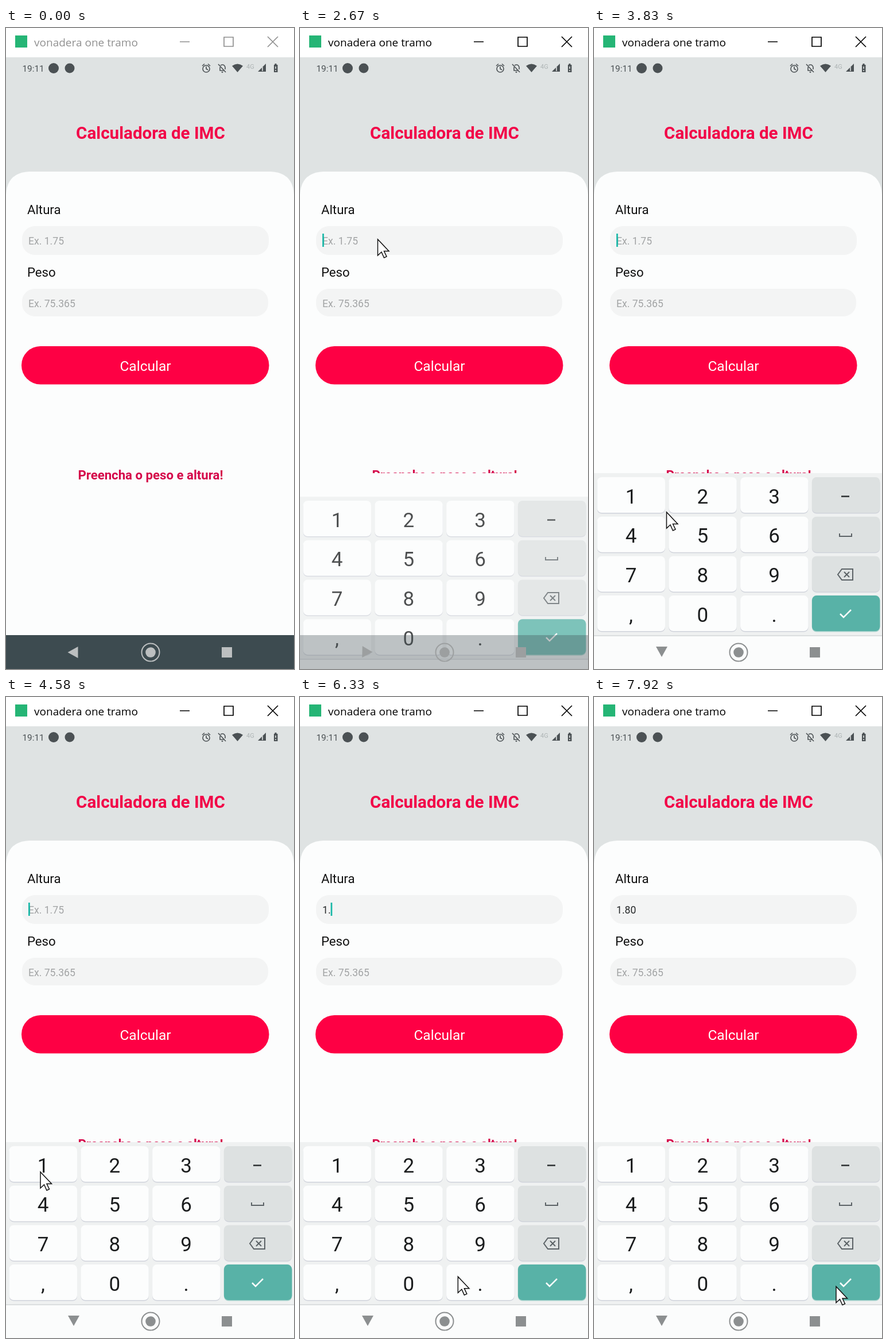
Animation, 502 px wide and 1116 px high, one loop 8000 ms. Source, as an HTML page:

```html
<!DOCTYPE html>
<html lang="pt">
<head>
<meta charset="utf-8">
<style>
  html, body { margin: 0; width: 502px; height: 1116px; overflow: hidden; background: #fcfdfd; }
  svg { display: block; font-family: Roboto, sans-serif; }
  .mid { text-anchor: middle; }
  .line { fill: none; stroke: currentColor; }
</style>
</head>
<body>
<svg width="502" height="1116" viewBox="0 0 502 1116">
  <rect width="502" height="300" y="50" fill="#dfe3e3"/>
  <rect width="502" height="51" fill="#fff"/>
  <rect x="16" y="13" width="21" height="21" fill="#25b575"/>
  <g id="titlebar">
    <text x="49" y="32" font-size="19" font-family="Open Sans, sans-serif" fill="currentColor">vonadera one tramo</text>
    <path class="line" stroke-width="1.7" d="M303 24h17M380 16h16v16h-16zM456 15l18 18M474 15l-18 18"/>
  </g>

  <g fill="#4b5154" color="#4b5154" stroke-width="1.6">
    <text x="28.5" y="76" font-size="15.3">19:11</text>
    <circle cx="83" cy="70" r="9"/>
    <circle cx="111" cy="70" r="8.5"/>
    <circle class="line" cx="349" cy="71" r="6"/>
    <path class="line" d="M349 67v4l3 2M342 66l4-3.500M356 66l-4-3.500"/>
    <path class="line" d="M370 63l13 14M373 68v6h8M374 65q6-3 8 3v4"/>
    <path d="M375 76h4l-2 2.500zM394 66q9.500-7 19 0l-9.500 11zM439 76l14-14v14zM467 64h1.500v-2h3v2h2v13h-6.500z"/>
    <path d="M470 67v4M470 73v2M447 68v7" stroke="#dfe3e3"/>
    <text x="419" y="71" font-size="11" fill="#aeb4b5">4G</text>
  </g>

  <text class="mid" x="252" y="193" font-size="29.6" font-weight="700" fill="#f20648">Calculadora de IMC</text>
  <path d="M0 1057V290Q2 252 40 250H462Q500 252 502 290V1057z" fill="#fcfdfd"/>
  <g font-size="22.2" fill="#111">
    <text x="37" y="324">Altura</text>
    <text x="37" y="433">Peso</text>
  </g>
  <rect x="28" y="345" width="430" height="50" rx="22" fill="#f3f4f4"/>
  <rect x="28" y="454" width="429" height="48" rx="22" fill="#f3f4f4"/>
  <g font-size="17.6" fill="#a2a4a5">
    <text id="height" x="39" y="376.5"></text>
    <text x="39" y="485.5">Ex. 75.365</text>
  </g>
  <rect id="caret" y="358" width="2.7" height="23" fill="#18b8a8"/>
  <rect x="27" y="554" width="431.5" height="66.5" rx="33" fill="#fe0044"/>
  <text class="mid" x="243" y="597" font-size="24.5" fill="#fff">Calcular</text>
  <text class="mid" x="252" y="786" font-size="22.2" font-weight="700" fill="#d5074a">Preencha o peso e altura!</text>

  <g id="keyboard">
    <rect y="775" width="502" height="341" fill="#fcfdfd"/>
    <g id="panel">
      <rect y="775" width="502" height="283" fill="#eff1f1"/>
      <rect y="1057" width="502" height="2" fill="#dcdfe0"/>
      <rect y="1059" width="502" height="57" fill="#fbfcfc"/>
      <g id="keys" font-size="35" fill="#1b1d1e"></g>
      <g color="#5c6367" stroke-width="2">
        <path class="line" color="#2c3032" stroke-width="2.5" d="M431 815.500h14"/>
        <path class="line" d="M428 880v5h21v-5"/>
        <path class="line" d="M425 951.500l7-9.500h19v19h-19zM436 947l9 9M445 947l-9 9"/>
        <path class="line" color="#fff" stroke-width="2.5" d="M429 1020l6 6l13-13"/>
      </g>
    </g>
  </g>
  <rect id="navShade" y="1057" width="502" height="59" fill="#3d4b50"/>
  <g id="nav" fill="currentColor">
    <path id="back" d="M-9 0L9-10V10z"/>
    <circle class="line" cx="252" cy="1087" r="15.5" stroke-width="2"/>
    <circle cx="252" cy="1087" r="8.8"/>
    <rect x="376" y="1078" width="18" height="18"/>
  </g>
  <path id="pointer" d="M0 0V28L6.500 22L11 32L15.500 30L11 20.500H19.500z" fill="#fff" stroke="#111" stroke-width="1.5"/>
</svg>
<script>
const $ = id => document.getElementById(id);
const set = (id, attributes) => {
  for (const name in attributes) $(id).setAttribute(name, attributes[name]);
};
const visible = on => on ? 'visible' : 'hidden';
const mix = (a, b, p) => a + (b - a) * p;

const STEP = 1000 / 12, LOOP = 8000;
const FOCUS = 330, ACTIVATE = 830, TAP_FIELD = 2420, OPEN = 2670;
const BLINK = 500, KEY_HOLD = 160;

const labels = [...'123 456 789 ,0. '];
$('keys').innerHTML = labels.map((label, i) => {
  const col = i % 4, x = 5.5 + col * 124.8, y = 782 + (i >> 2) * 68.7;
  const enter = i === labels.length - 1;
  const fill = enter ? '#58b2a7' : col === 3 ? '#dde1e1' : '#fcfdfd';
  const key = (dy, color, id) =>
    `<rect id="${id}" x="${x}" y="${y + dy}" width="118.5" height="62" rx="8" fill="${color}"/>`;
  return key(1.5, enter ? '#a9d3cd' : '#d0d3db', 'edge' + i) + key(0, fill, 'key' + i) +
    `<text class="mid" x="${x + 59}" y="${y + 45.5}">${label}</text>`;
}).join('');

const taps = [
  { char: '1', at: 5330 },
  { char: '.', at: 6170 },
  { char: '8', at: 6670 },
  { char: '0', at: 7170 }
];

// Pointer glides; "via" bends the curve
const moves = [
  { from: 1250, until: 2080, to: [135.5, 368], via: [184, 560] },
  { from: 3000, until: 3830, to: [126.5, 843], via: [360, 880] },
  { from: 3840, until: 4580, to: [60, 827] },
  { from: 5330, until: 5920, to: [322, 1040], via: [148, 890] },
  { from: 6250, until: 6500, to: [213, 968] },
  { from: 6670, until: 6830, to: [192.5, 1023] },
  { from: 7170, until: 7920, to: [422, 1026.5], via: [500, 1035] }
];

function pointerAt(t) {
  let spot = [-3, 749];
  for (const { from, until, to, via } of moves) {
    if (t < from) break;
    const p = 1 - (1 - Math.min(1, (t - from) / (until - from))) ** 1.3;
    spot = spot.map((start, axis) => {
      const bend = via ? via[axis] : mix(start, to[axis], 0.5);
      return mix(mix(start, bend, p), mix(bend, to[axis], p), p);
    });
  }
  return spot;
}

function drawField(t) {
  const done = taps.filter(tap => t >= tap.at);
  const value = done.map(tap => tap.char).join('');
  $('height').textContent = value || 'Ex. 1.75';
  set('height', { fill: value ? '#26292a' : '#a2a4a5' });

  const restart = done.length ? done.at(-1).at : t >= TAP_FIELD ? TAP_FIELD : FOCUS;
  const lit = t >= restart && Math.floor((t - restart) / BLINK) % 2 === 0;
  const width = value ? $('height').getComputedTextLength() : 0;
  set('caret', { x: 39 + width, visibility: visible(lit) });
}

function drawKeyboard(t) {
  const open = t < OPEN ? 0 : 1 - 0.33 * Math.max(0, 1 - (t - OPEN) / 250) ** 2;
  const grey = mix(188, 140, open);
  set('keyboard', { visibility: visible(open) });
  set('panel', { transform: `translate(0 ${125 * (1 - open)})`, opacity: mix(0.3, 1, open) });
  set('navShade', { opacity: 1 - open });
  set('nav', { color: `rgb(${grey},${grey + 3},${grey + 4})` });
  set('back', { transform: `translate(${mix(116.5, 118, open)} ${mix(1087, 1086, open)}) rotate(${270 * open})` });

  for (const { char, at } of taps) {
    const down = t >= at - KEY_HOLD && t < at + STEP;
    set('key' + labels.indexOf(char), { fill: down ? '#eef2f2' : '#fcfdfd' });
  }
}

function draw(ms) {
  // Hold each pose for one twelfth of a second
  const t = Math.floor((ms % LOOP + 4) / STEP) * STEP + 4;
  set('titlebar', { color: t < ACTIVATE ? '#909090' : '#000' });
  drawField(t);
  drawKeyboard(t);
  set('pointer', { transform: `translate(${pointerAt(t)})`, visibility: visible(t >= moves[0].from) });
}

const start = performance.now();
function tick() {
  draw(performance.now() - start);
  requestAnimationFrame(tick);
}
tick();
</script>
</body>
</html>
```
